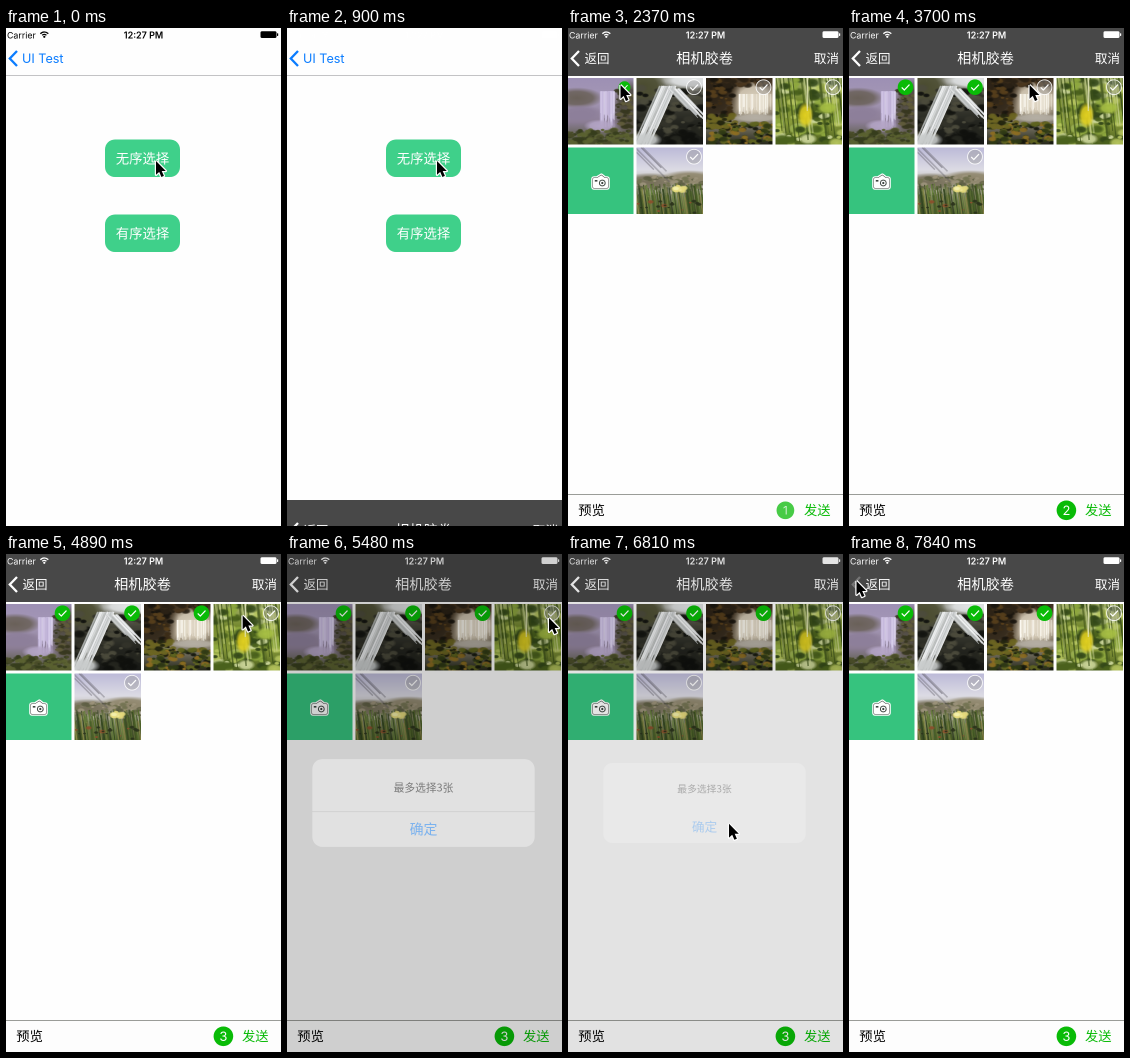
These frames come from a looping animation (275x498 px, 7.99 s). An HTML page with a canvas:

```html
<!DOCTYPE html>
<html lang="zh">
<head>
<meta charset="utf-8">
<title>Photo picker</title>
<style>
html, body { margin: 0; width: 100%; height: 100%; overflow: hidden; background: #fefefe; }
canvas { display: block; width: 275px; height: 498px; }
</style>
</head>
<body>
<canvas id="stage"></canvas>
<script>
const W = 275, H = 498, LOOP = 7990, STEP = 147.7;
const CJK = '"Noto Sans CJK SC", "Noto Sans CJK", sans-serif';
const LATIN = 'Inter, Roboto, sans-serif';
const GREEN = '#09bb07', CELL = 66.5, PITCH = 69.5, MID = 136.5;
const TAPS = [2340, 3400, 4210];
const SLIDE = 880, ALERT_IN = 5400, ALERT_OUT = 6640;
const dpr = Math.max(2, window.devicePixelRatio || 1);
const canvas = document.getElementById('stage');
canvas.width = W * dpr;
canvas.height = H * dpr;
let ctx = canvas.getContext('2d');
ctx.scale(dpr, dpr);

// ---- motion ----
const clamp = v => Math.min(1, Math.max(0, v));
const smooth = u => u * u * (3 - 2 * u);
const settle = ms => ms < 0 ? 0 : Math.min(1, 1.02 * (1 - Math.exp(-ms / 132)));
const pop = ms => 1 - 0.7 * Math.exp(-ms / 60) * Math.cos(ms / 42);

function slide(ms) {
  const w = 0.01826 * ms;
  return Math.round(H * (1 + w) * Math.exp(-w) * 2) / 2;
}

// ---- drawing helpers ----
function rect(x, y, w, h, color) {
  ctx.fillStyle = color;
  ctx.fillRect(x, y, w, h);
}

function round(x, y, w, h, r, color) {
  ctx.fillStyle = color;
  ctx.beginPath();
  ctx.roundRect(x, y, w, h, r);
  ctx.fill();
}

function disc(x, y, r, color) {
  ctx.fillStyle = color;
  ctx.beginPath();
  ctx.arc(x, y, r, 0, 7);
  ctx.fill();
}

function line(color, width, ...pts) {
  ctx.beginPath();
  for (let i = 0; i < pts.length; i += 2) ctx.lineTo(pts[i], pts[i + 1]);
  ctx.strokeStyle = color;
  ctx.lineWidth = width;
  ctx.stroke();
}

function text(str, x, y, size, color, align = 'left', weight = 400, family = CJK) {
  ctx.font = `${weight} ${size}px ${family}`;
  ctx.textAlign = align;
  ctx.fillStyle = color;
  ctx.fillText(str, x, y + size * 0.37);
}

function at(x, y, scale, draw) {
  ctx.save();
  ctx.translate(x, y);
  ctx.scale(scale, scale);
  draw();
  ctx.restore();
}

// ---- photos: soft patches, seeded specks and strands in a unit square ----
let seed = 1;
const rnd = () => (seed = seed * 16807 % 2147483647) / 2147483647;
const pick = list => list[Math.floor(rnd() * list.length)];

function sky(...stops) {
  const g = ctx.createLinearGradient(0, 0, 0, 1);
  stops.forEach((c, i) => g.addColorStop(i / (stops.length - 1), c));
  rect(0, 0, 1, 1, g);
}

function glow(x, y, rx, ry, color) {
  const g = ctx.createRadialGradient(0, 0, 0, 0, 0, 1);
  g.addColorStop(0, color);
  g.addColorStop(0.6, color + 'dd');
  g.addColorStop(1, color + '00');
  ctx.save();
  ctx.translate(x, y);
  ctx.scale(rx, ry);
  disc(0, 0, 1, g);
  ctx.restore();
}

function specks(n, x, y, w, h, r, ...colors) {
  for (let i = 0; i < n; i++) {
    const k = r * (0.4 + rnd());
    glow(x + rnd() * w, y + rnd() * h, k, k * 0.6, pick(colors));
  }
}

function strands(n, x, y, w, dx, dy, ...colors) {
  for (let i = 0; i < n; i++) {
    const x0 = x + rnd() * w, k = 0.6 + rnd() * 0.5;
    ctx.globalAlpha = 0.3 + rnd() * 0.5;
    ctx.beginPath();
    ctx.moveTo(x0, y);
    ctx.quadraticCurveTo(x0 + dx * k * 0.3, y + dy * k * 0.3, x0 + dx * k, y + dy * k);
    ctx.strokeStyle = pick(colors);
    ctx.lineWidth = 0.012 + rnd() * 0.015;
    ctx.stroke();
  }
  ctx.globalAlpha = 1;
}

const scenes = [
  function valley() {
    sky('#9d90b4', '#a598b6', '#8b7d94', '#4c5230');
    glow(0.15, 0.3, 0.4, 0.16, '#6a6159');
    glow(0.95, 0.45, 0.27, 0.45, '#4a4532');
    glow(0.2, 0.53, 0.35, 0.13, '#8d7f9a');
    specks(60, 0.75, 0.15, 0.25, 0.6, 0.05, '#37371f', '#605b3a', '#55504a');
    strands(60, 0.5, 0.2, 0.23, 0, 0.52, '#e9e2f8', '#cfc3e4', '#b9abd2');
    glow(0.5, 0.72, 0.25, 0.1, '#b4a5c6');
    specks(110, 0, 0.78, 1, 0.22, 0.06, '#363d1c', '#5a6130', '#484b28');
  },
  function rapids() {
    sky('#8d8e82', '#45453a', '#24251f', '#171815');
    glow(0.85, 0.04, 0.5, 0.13, '#e4e6e8');
    glow(0.1, 0.12, 0.35, 0.25, '#4b4c30');
    specks(90, 0, 0.15, 1, 0.85, 0.08, '#12130f', '#33332a', '#4c4b3c');
    strands(70, 0.34, 0.12, 0.25, -0.4, 0.9, '#f6f7f8', '#d6d9da', '#b0b4b4');
    strands(30, 0.48, 0.16, 0.2, 0.4, 0.42, '#f6f7f8', '#c2c5c6');
    glow(0.14, 0.93, 0.25, 0.12, '#c9cccc');
    specks(25, 0.5, 0.72, 0.5, 0.28, 0.08, '#0f100d', '#25261f');
  },
  function cove() {
    sky('#3a2c1c', '#8c7a60', '#857f70', '#26281a');
    glow(0.72, 0.32, 0.38, 0.3, '#d8cebb');
    glow(0.1, 0.25, 0.42, 0.48, '#2b2114');
    specks(70, 0, 0, 0.4, 0.65, 0.06, '#19150e', '#573f1c', '#3a2b16');
    specks(40, 0.3, 0, 0.7, 0.12, 0.06, '#2a2115', '#4b371f');
    strands(50, 0.5, 0.24, 0.48, 0, 0.3, '#fffdf6', '#e9e2d2');
    glow(0.75, 0.6, 0.4, 0.07, '#b5afa4');
    specks(130, 0, 0.68, 1, 0.32, 0.06, '#15180d', '#5f6420', '#8d6d22', '#2f3914');
    specks(35, 0, 0.55, 0.45, 0.2, 0.06, '#23250f', '#6c6522');
  },
  function leaves() {
    sky('#a3b06a', '#75892f', '#889a3a', '#4a5d1d');
    specks(110, 0, 0, 1, 1, 0.11, '#4a611c', '#8ea83e', '#b4c35c', '#324718', '#cdd79c');
    strands(30, 0, 0, 1, 0.1, 0.9, '#c6d08e', '#3d511a');
    glow(0.45, 0.56, 0.12, 0.2, '#e0cf20');
    glow(0.78, 0.45, 0.16, 0.1, '#a8c045');
    strands(2, 0.47, 0, 0.03, 0, 0.6, '#dfe2b4');
  },
  function meadow() {
    sky('#bcbad8', '#dcdbe4', '#a9a590', '#46522b');
    glow(0.2, 0.52, 0.45, 0.14, '#77705a');
    glow(0.8, 0.47, 0.45, 0.13, '#8d8469');
    specks(70, 0, 0.43, 1, 0.2, 0.05, '#9c937b', '#5f5f45', '#737352');
    strands(4, -0.1, 0, 0.2, 0.5, 0.5, '#55525a');
    strands(170, -0.05, 1, 1.1, -0.06, -0.42, '#66803a', '#2b3d1c', '#8f8a4c', '#495e25');
    specks(18, 0, 0.8, 1, 0.2, 0.04, '#8a4f2c', '#2b331b');
    specks(9, 0.58, 0.58, 0.14, 0.1, 0.06, '#f4f0ae', '#e6db7c');
  }
];

const photos = scenes.map((draw, i) => {
  const c = document.createElement('canvas');
  c.width = c.height = Math.round(CELL * dpr);
  const main = ctx;
  ctx = c.getContext('2d');
  ctx.scale(c.width, c.width);
  seed = 71 + i * 913;
  draw();
  ctx = main;
  return c;
});

// ---- interface ----
function statusBar(color) {
  text('Carrier', 1, 7, 8.8, color, 'left', 400, LATIN);
  text('12:27 PM', 137.5, 7, 9, color, 'center', 600, LATIN);
  for (const r of [2.8, 5.2]) {
    ctx.beginPath();
    ctx.arc(38.3, 9.2, r, -Math.PI * 0.77, -Math.PI * 0.23);
    ctx.strokeStyle = color;
    ctx.lineWidth = 1.3;
    ctx.stroke();
  }
  disc(38.3, 8.8, 1.1, color);
  round(254.5, 3.2, 16, 6.8, 1.5, color);
  round(271, 5.2, 1.2, 2.8, 0.5, color);
}

function chevron(color) {
  line(color, 2.3, 11, 23, 3.8, 30.5, 11, 38);
}

function home() {
  rect(0, 0, W, H, '#fefefe');
  rect(0, 47, W, 0.8, '#b5b5b8');
  chevron('#0a7cff');
  text('UI Test', 16, 30.5, 12.6, '#0a7cff', 'left', 400, LATIN);
  ['无序选择', '有序选择'].forEach((label, i) => {
    const y = 111.5 + i * 75;
    round(99, y, 75, 37.5, 10, '#3fd08a');
    text(label, MID, y + 18.8, 13.4, '#fff', 'center');
  });
}

function mark(x, y, ms) {
  const on = ms >= 0;
  at(x, y, on ? pop(ms) : 1, () => {
    disc(0, 0, on ? 7.8 : 7.4, on ? GREEN : 'rgba(150,150,150,.4)');
    if (!on) {
      ctx.strokeStyle = 'rgba(255,255,255,.9)';
      ctx.lineWidth = 0.9;
      ctx.stroke();
    }
    line('#fff', 1.2, -3.8, 0.2, -1.2, 2.8, 4, -2.6);
  });
}

function camera(x, y) {
  at(x, y, 1, () => {
    ctx.lineJoin = 'round';
    for (const [color, width] of [['#fff', 3.6], ['#3c4540', 1]]) {
      ctx.beginPath();
      ctx.roundRect(-7.5, -3.5, 15, 10, 1);
      ctx.moveTo(-3.5, -3.5);
      ctx.lineTo(0.8, -6.3);
      ctx.lineTo(4.5, -3.5);
      ctx.strokeStyle = color;
      ctx.lineWidth = width;
      ctx.stroke();
      ctx.fillStyle = '#fff';
      ctx.fill();
    }
    disc(1.8, 1.5, 3.4, '#3c4540');
    disc(1.8, 1.5, 2.4, '#fff');
    disc(1.8, 1.5, 1.1, '#3c4540');
    rect(-5.7, -1.5, 2.6, 1.6, '#3c4540');
  });
}

function bottomBar(t, count) {
  rect(0, 466, W, 32, '#fdfdfd');
  rect(0, 466, W, 1, '#9a9c98');
  text('预览', 10.3, 482.3, 13.3, count ? '#000' : '#b1b1b1');
  text('发送', 236, 482.3, 13.3, count ? GREEN : '#b3e5b5');
  if (!count) return;
  const ms = t - TAPS[count - 1];
  at(217.4, 482.3, 0.6 + 0.4 * pop(ms), () => {
    ctx.globalAlpha = clamp(ms / 50);
    disc(0, 0, 9.8, GREEN);
    text(count, 0, 0, 13, '#fff', 'center', 400, LATIN);
  });
}

function picker(t) {
  rect(0, 0, W, H, '#fefefe');
  rect(0, 0, W, 48, '#484848');
  chevron(t > 7800 ? 'rgba(255,255,255,.25)' : '#fff');
  text('返回', 16.5, 30.3, 12.5, '#fff');
  text('相机胶卷', MID, 30, 14.2, '#fff', 'center');
  text('取消', 271, 30.3, 12.6, '#fff', 'right');
  photos.forEach((img, i) => {
    const x = -1 + PITCH * (i < 4 ? i : 1), y = i < 4 ? 50 : 50 + PITCH;
    ctx.drawImage(img, x, y, CELL, CELL);
    mark(x + 57.5, y + 9.2, i < TAPS.length ? t - TAPS[i] : -1);
  });
  rect(-1, 50 + PITCH, CELL, CELL, '#36c37e');
  camera(32.5, 153.5);
  bottomBar(t, TAPS.filter(tap => t >= tap).length);
}

function alertBox(t) {
  const shown = settle(t - ALERT_IN);
  const p = shown * (1 - settle(t - ALERT_OUT));
  if (p <= 0) return;
  rect(0, 0, W, H, `rgba(0,0,0,${0.4 * p})`);
  at(MID, 249, 1.18 - 0.18 * shown, () => {
    ctx.globalAlpha = p;
    round(-101.3, -40, 202.6, 80, 9, '#f7f7f7');
    rect(-101.3, 7.5, 202.6, 0.8, `rgba(150,150,150,${1 - shown})`);
    text('最多选择3张', 0, -14, 9.8, '#000', 'center');
    text('确定', 0, 24, 12.7, '#007aff', 'center', 500);
  });
}

// Each move: start, end, and the point reached.
const MOVES = [
  [1400, 1950, 52.5, 57],
  [2600, 3300, 122, 57],
  [3400, 3800, 190, 57],
  [4450, 5180, 262, 64],
  [6100, 6510, 161, 270],
  [6800, 7250, 151, 48],
  [7250, 7840, 7.5, 27]
];

function cursor(t) {
  let x = 150, y = 133;
  for (const [from, to, tx, ty] of MOVES) {
    const u = smooth(clamp((t - from) / (to - from)));
    x += (tx - x) * u;
    y += (ty - y) * u;
  }
  at(x, y, 1, () => {
    ctx.lineJoin = 'round';
    line('#fff', 2.4, 0, 0, 0, 13.8, 3.2, 10.9, 5.4, 16, 7.9, 14.9, 5.7, 10, 9.8, 10, 0, 0);
    ctx.fillStyle = '#000';
    ctx.fill();
  });
}

function render(now) {
  // The picture advances in even steps after a first pause.
  const step = Math.floor((now % LOOP - 892) / STEP);
  const t = step < 0 ? 0 : 900 + step * STEP;
  home();
  if (t > 0) at(0, slide(t - SLIDE), 1, () => picker(t));
  statusBar(t > 0 ? '#fff' : '#000');
  alertBox(t);
  cursor(t);
}

const start = performance.now();
function tick() {
  render(performance.now() - start);
  requestAnimationFrame(tick);
}
tick();
</script>
</body>
</html>
```
